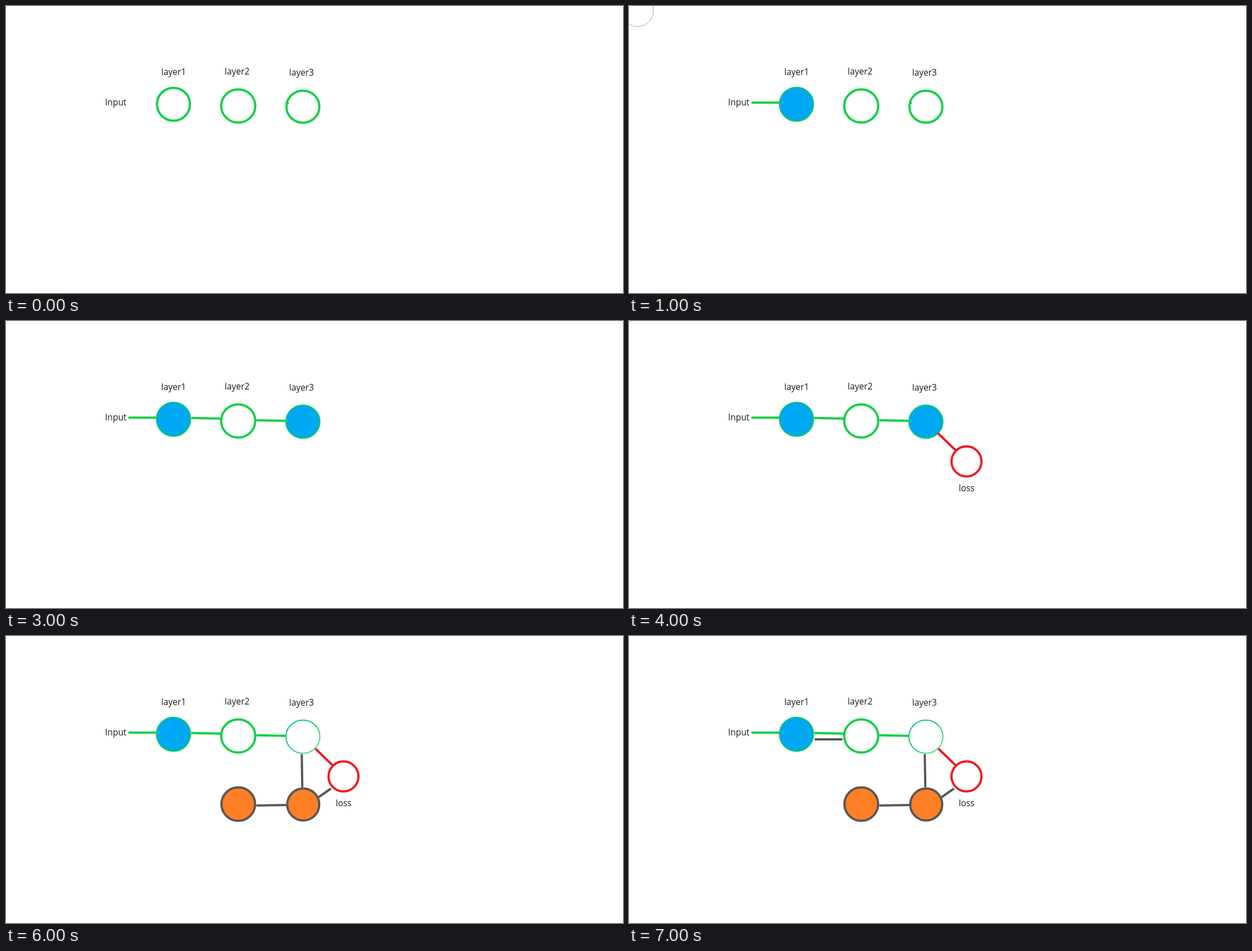
Write an HTML page that moves like this. It is 1096 px wide and 511 px high and loops after 8000 ms.

```html
<!DOCTYPE html>
<html lang="en">
<head>
<meta charset="utf-8">
<title>Checkpointed layers</title>
<style>
  html, body { margin: 0; width: 100%; height: 100%; overflow: hidden; background: #fff; }
  svg { display: block; width: 1096px; height: 511px; }
  ellipse, line { fill: none; stroke-width: 4; stroke-linecap: round; }
  text { font: 15.4px "Open Sans", "Noto Sans", sans-serif; fill: #1a1a1a; }
  .green { stroke: #0ed145; }
  .red { stroke: #ec1c24; }
  .gray { stroke: #585858; }
  .blue { fill: #00a8f3; }
  .orange { fill: #ff7f27; }
</style>
</head>
<body>
<svg viewBox="0 0 1096 511">
  <defs>
    <linearGradient id="rim" x1="0" y1="0.1" x2="0.8" y2="1">
      <stop offset="0" stop-color="#08b4b0"/>
      <stop offset="0.45" stop-color="#14cc68"/>
      <stop offset="1" stop-color="#5ee086"/>
    </linearGradient>
  </defs>

  <text x="275.8" y="123" font-size="15">layer1</text>
  <text x="388.6" y="122">layer2</text>
  <text x="503" y="124">layer3</text>
  <text x="176" y="177">Input</text>

  <ellipse class="green" cx="297.5" cy="175" rx="29.3" ry="29.3"/>
  <ellipse class="green" cx="412.5" cy="178" rx="30.3" ry="29.5"/>
  <circle cx="382.3" cy="177" r="2.2" fill="#0ed145"/>
  <g data-to="6">
    <ellipse class="green" cx="527.4" cy="179.3" rx="29.3" ry="28.5"/>
    <circle cx="500.3" cy="173" r="2.2" fill="#0ed145"/>
  </g>

  <g data-from="1">
    <line class="green" x1="219" y1="172" x2="267" y2="172"/>
    <ellipse class="blue" cx="297.3" cy="174.8" rx="29.6" ry="29.5"/>
  </g>
  <ellipse data-from="1" data-to="2" cx="15" cy="8" rx="28.7" ry="28.5" stroke="#aaa" style="stroke-width:1"/>
  <line data-from="2" class="green" x1="330.5" y1="172.7" x2="380" y2="173.8"/>
  <line data-from="3" class="green" x1="446.5" y1="176.7" x2="496" y2="177.8"/>
  <ellipse data-from="3" data-to="6" class="blue" cx="527.2" cy="179.2" rx="29.6" ry="28.8"/>

  <g data-from="4">
    <line class="red" x1="549.5" y1="200.5" x2="580" y2="230"/>
    <ellipse class="red" cx="599.5" cy="250" rx="26.6" ry="26.8"/>
    <text x="585.8" y="303">loss</text>
  </g>

  <g data-from="5">
    <line class="gray" x1="525.4" y1="212" x2="526.3" y2="268"/>
    <line class="gray" x1="556" y1="286.5" x2="576" y2="272.5"/>
    <ellipse class="gray orange" cx="528" cy="300" rx="28.4" ry="28.4"/>
  </g>

  <g data-from="6">
    <ellipse cx="527.4" cy="179.3" rx="30.2" ry="29.5" stroke="url(#rim)" style="stroke-width:2"/>
    <line class="gray" x1="446" y1="301.8" x2="497" y2="301"/>
    <ellipse class="gray orange" cx="412.6" cy="299.3" rx="29.9" ry="29.8"/>
  </g>
  <line data-from="7" class="gray" x1="331.3" y1="184" x2="377.7" y2="184"/>
</svg>
<script>
  const parts = [...document.querySelectorAll("[data-from], [data-to]")];
  const start = performance.now();

  // Each part shows from second data-from until second data-to of the 8 s loop.
  function draw(now) {
    const second = Math.max(0, now - start) % 8000 / 1000;
    for (const part of parts) {
      const { from = 0, to = 8 } = part.dataset;
      part.style.display = second >= +from && second < +to ? "" : "none";
    }
    requestAnimationFrame(draw);
  }
  draw(start);
</script>
</body>
</html>
```
